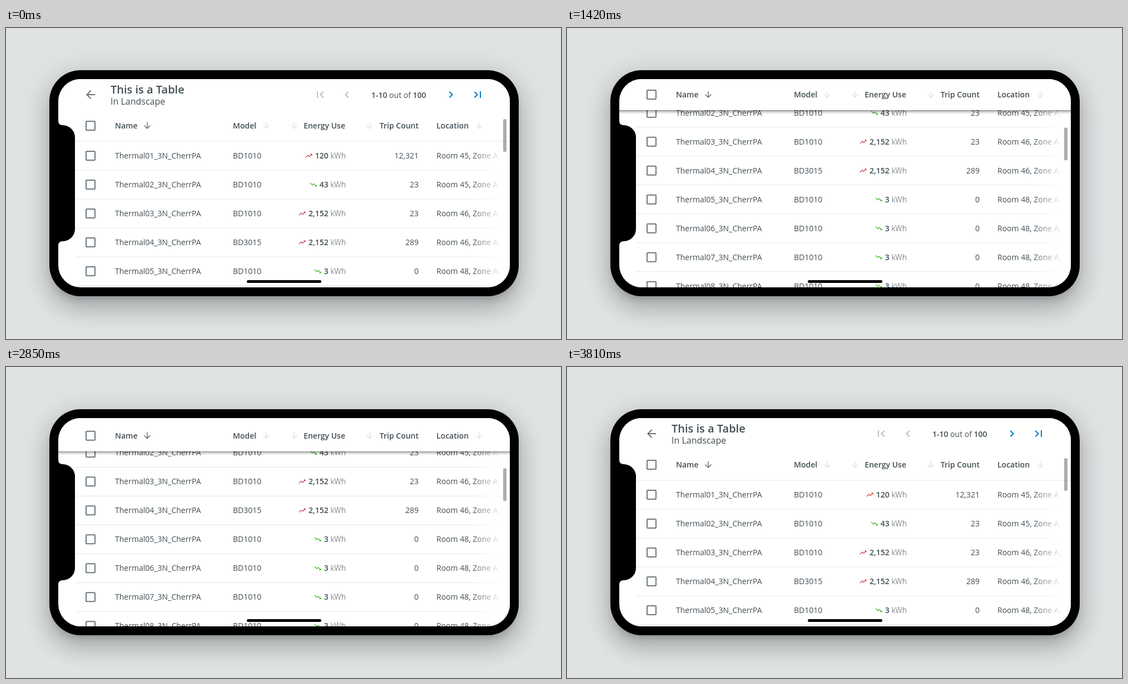
Write an HTML page that moves like this. It is 998x560 px and loops after 4.65 s.

```html
<!DOCTYPE html>
<html lang="en">
<head>
<meta charset="utf-8">
<title>Landscape table</title>
<style>
  html, body { margin: 0; width: 100%; height: 100%; overflow: hidden; background: #dfe3e4; }
  .phone {
    position: absolute; left: 78px; top: 76px; width: 844px; height: 407px;
    border-radius: 56px; background: #000;
    box-shadow: 0 11px 15px -7px rgba(0,0,0,.2), 0 24px 38px 3px rgba(0,0,0,.14), 0 9px 46px 8px rgba(0,0,0,.12);
  }
  svg { position: absolute; left: 0; top: 0; display: block; }
  text { font: 400 14px "Open Sans", "Noto Sans", sans-serif; fill: #424e54; white-space: pre; }
  .bold { font-weight: 600; }
  .light { font-weight: 300; }
  .title { font-size: 20px; font-weight: 600; }
  .subtitle { font-size: 16px; }
  .end { text-anchor: end; }
  .box { fill: none; stroke: #6b7980; stroke-width: 2; }
</style>
</head>
<body>
<div class="phone"></div>
<svg width="998" height="560" viewBox="0 0 998 560">
  <defs>
    <clipPath id="screen"><rect x="94" y="92" width="812" height="375" rx="40"/></clipPath>
    <linearGradient id="fade" gradientUnits="userSpaceOnUse" x1="836" x2="892">
      <stop offset="0" stop-color="#fff" stop-opacity="0"/>
      <stop offset="1" stop-color="#fff"/>
    </linearGradient>
    <linearGradient id="shade" x2="0" y2="1">
      <stop offset="0" stop-opacity=".5"/>
      <stop offset=".3" stop-opacity=".22"/>
      <stop offset="1" stop-opacity="0"/>
    </linearGradient>
  </defs>
  <g clip-path="url(#screen)">
    <rect x="94" y="92" width="812" height="375" fill="#fff"/>
    <g id="rows"></g>
    <rect x="836" y="92" width="70" height="375" fill="url(#fade)"/>
    <g id="header">
      <rect id="shadow" x="94" y="204" width="812" height="7" fill="url(#shade)"/>
      <rect x="94" y="92" width="812" height="112" fill="#fff"/>
      <path id="rule" d="M94 204H906" stroke="#e4e6e7"/>
    </g>
    <path d="M94 167Q94 175 102 175A22 22 0 0 1 124 197V362A22 22 0 0 1 102 384Q94 384 94 392Z"/>
    <rect id="bar" x="894" y="164" width="6" height="59" rx="2.5" opacity=".32"/>
    <rect x="433" y="454" width="134" height="5" rx="2.5"/>
  </g>
</svg>
<script>
const LOOP = 4650;
const SCROLL = 136;
const TITLE_HEIGHT = 56;
const $ = id => document.getElementById(id);

const ICONS = {
  back: 'M20 11H7.83l5.59-5.59L12 4l-8 8 8 8 1.41-1.41L7.83 13H20z',
  down: 'M20 12l-1.41-1.41L13 16.17V4h-2v12.17l-5.58-5.59L4 12l8 8z',
  first: 'M18.41 16.59L13.82 12l4.59-4.59L17 6l-6 6 6 6zM6 6h2v12H6z',
  previous: 'M15.41 7.41L14 6l-6 6 6 6 1.41-1.41L10.83 12z',
  trend: 'M16 6l2.29 2.29-4.88 4.88-4-4L2 16.59 3.41 18l6-6 4 4 6.3-6.29L22 12V6z'
};

const icon = (name, x, y, color, sx = 1, sy = Math.abs(sx)) =>
  `<path d="${ICONS[name]}" fill="${color}" transform="translate(${x} ${y}) scale(${sx} ${sy}) translate(-12 -12)"/>`;
const label = (x, y, content, style = '') => `<text x="${x}" y="${y}" class="${style}">${content}</text>`;
const span = (content, style) => `<tspan class="${style}">${content}</tspan>`;
const checkbox = y => `<rect class="box" x="144" y="${y - 8}" width="16" height="16" rx="1"/>`;

function row(index, model, energy, rising, trips, room) {
  const y = 230 + 52 * index;
  const digits = energy.replace(',', '').length;
  const trendX = 568.5 - 8 * digits - (energy.includes(',') ? 4 : 0);
  const name = `Thermal${String(index + 1).padStart(2, '0')}_3N_CherrPA`;
  return checkbox(y)
    + label(196, y + 5, name)
    + label(408, y + 5, model)
    + icon('trend', trendX, y, rising ? '#ca3c3d' : '#39b620', .6, rising ? .6 : -.6)
    + label(611, y + 5, span(energy, 'bold') + span(' kWh', 'light'), 'end')
    + label(742, y + 5, trips, 'end')
    + label(774, y + 5, `Room ${room}, Zone A,`)
    + `<path d="M124 ${y + 26}H892" stroke="#e4e6e7"/>`;
}

const devices = [
  ['BD1010', '120', true, '12,321', 45],
  ['BD1010', '43', false, '23', 45],
  ['BD1010', '2,152', true, '23', 46],
  ['BD3015', '2,152', true, '289', 46]
];
while (devices.length < 10) devices.push(['BD1010', '3', false, '0', 48]);
$('rows').innerHTML = devices.map((device, i) => row(i, ...device)).join('');

const pale = '#e1e4e5', disabled = '#b9bec1', blue = '#007bc1';
$('header').insertAdjacentHTML('beforeend',
  icon('back', 152, 120, '#66737a')
  + label(188, 118, 'This is a Table', 'title')
  + label(188, 138, 'In Landscape', 'subtitle')
  + icon('first', 565, 120, disabled)
  + icon('previous', 613, 120, disabled)
  + label(657, 126, span('1-10', 'bold') + ' out of ' + span('100', 'bold'))
  + icon('previous', 800, 120, blue, -1)
  + icon('first', 848, 120, blue, -1)
  + checkbox(176)
  + label(196, 181, 'Name', 'bold')
  + label(408, 181, 'Model', 'bold')
  + label(610, 181, 'Energy Use', 'bold end')
  + label(742, 181, 'Trip Count', 'bold end')
  + label(774, 181, 'Location', 'bold')
  + icon('down', 254, 176, '#66737a', .75)
  + [468, 518, 654, 851].map(x => icon('down', x, 176, pale, .75)).join(''));

const clamp = v => Math.min(1, Math.max(0, v));

// Cubic bezier (x1, 0, x2, 1), solved for the curve parameter by bisection.
function ease(time, x1, x2) {
  if (time <= 0 || time >= 1) return clamp(time);
  let low = 0, high = 1, s = .5;
  for (let i = 0; i < 24; i++) {
    s = (low + high) / 2;
    const x = 3 * (1 - s) ** 2 * s * x1 + 3 * (1 - s) * s * s * x2 + s ** 3;
    if (x < time) low = s; else high = s;
  }
  return s * s * (3 - 2 * s);
}

const snap = (t, start, step) => start + Math.floor((t - start) / step + 1e-6) * step;

function pose(t) {
  if (t < 900) return { scroll: 0, header: 0, bar: 0, shade: 0 };
  if (t < 2670) {
    const now = snap(t, 900, 57.7);
    const p = 1 - clamp((1708 - now) / 865) ** 2.74;
    const header = Math.min(TITLE_HEIGHT, SCROLL * p);
    const settle = Math.min(4, Math.max(0, Math.floor((t - 1950) / 60) + 1));
    return { scroll: SCROLL * p, header, bar: 16 * p + settle, shade: header / TITLE_HEIGHT };
  }
  const elapsed = snap(t, 2670, 60) - 2670;
  const header = TITLE_HEIGHT * (1 - ease(elapsed / 1140, .42, .217));
  return {
    scroll: SCROLL * (1 - ease(elapsed / 1140, .42, .3)),
    header,
    bar: 20 * (1 - ease(elapsed / 1020, .42, .17)),
    shade: clamp(1.7 * header / TITLE_HEIGHT)
  };
}

function render(t) {
  const { scroll, header, bar, shade } = pose(t);
  const shift = (id, y) => $(id).setAttribute('transform', `translate(0 ${y.toFixed(2)})`);
  shift('rows', -scroll);
  shift('header', -header);
  shift('bar', bar);
  $('shadow').setAttribute('opacity', shade);
  $('rule').setAttribute('opacity', 1 - shade);
}

const start = performance.now();
function tick() {
  render((performance.now() - start) % LOOP);
  requestAnimationFrame(tick);
}
tick();
</script>
</body>
</html>
```
